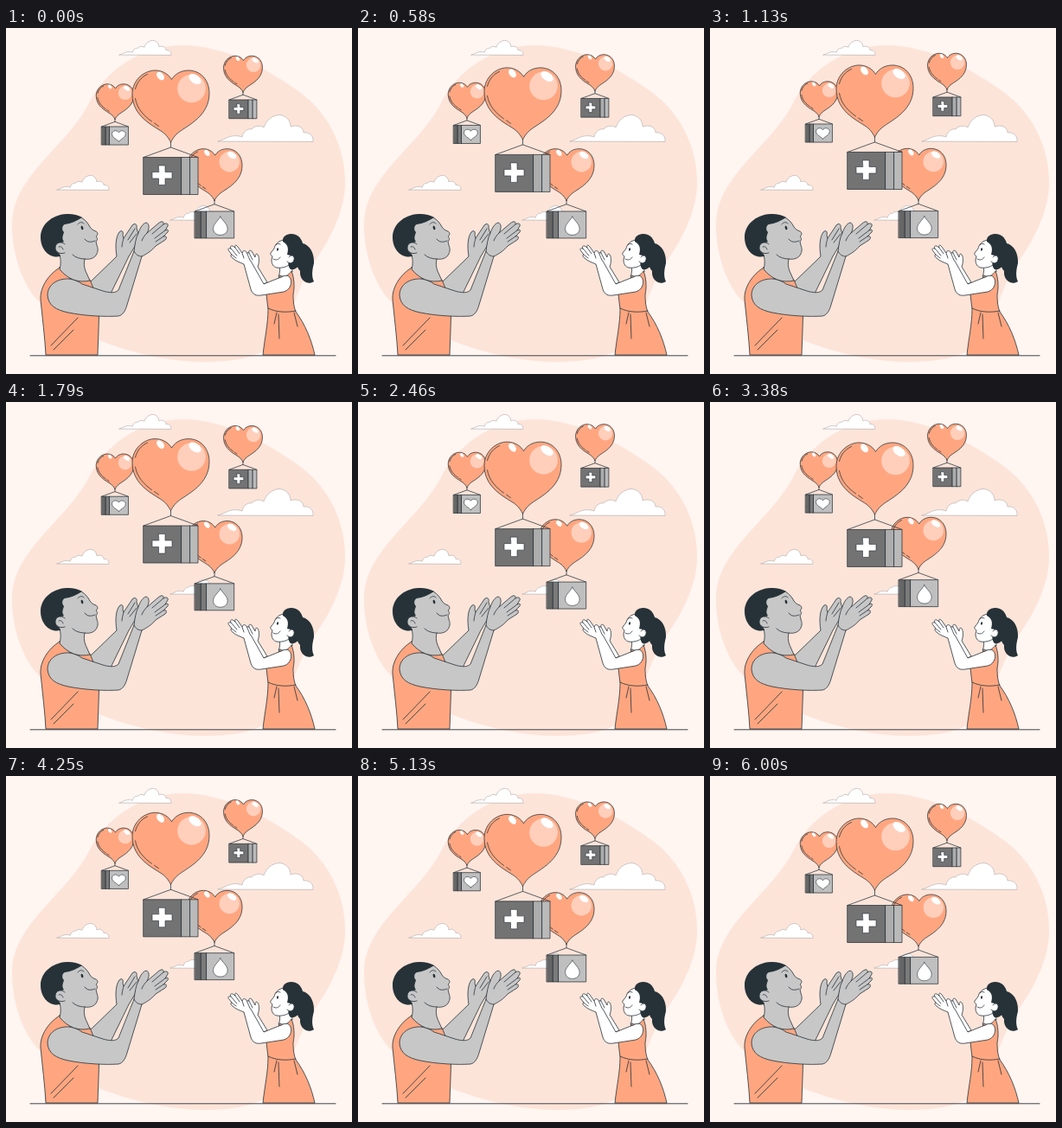
An HTML page with a canvas for the animation above (6.04 s loop, 400 px wide and 400 px high).

```html
<!DOCTYPE html>
<html lang="en">
<head>
<meta charset="utf-8">
<title>Floating aid</title>
<style>
html, body { margin: 0; width: 100%; height: 100%; overflow: hidden; background: #fff5f1; }
canvas { display: block; width: 400px; height: 400px; }
</style>
</head>
<body>
<canvas id="stage"></canvas>
<script>
const LOOP = 6040;
const INK = '#263238', ORANGE = '#ffa680', SKIN = '#c7c7c7', WHITE = '#fff';
const canvas = document.getElementById('stage');
const ctx = canvas.getContext('2d');
const dpr = window.devicePixelRatio || 1;
canvas.width = canvas.height = 400 * dpr;

function shape(d, fill, stroke = INK, width = 0.8) {
  const p = new Path2D(d);
  if (fill) { ctx.fillStyle = fill; ctx.fill(p); }
  if (stroke) { ctx.strokeStyle = stroke; ctx.lineWidth = width; ctx.stroke(p); }
}

const line = (d, width) => shape(d, null, INK, width);

function oval(x, y, rx, ry, turn, fill) {
  ctx.beginPath();
  ctx.ellipse(x, y, rx, ry, turn, 0, 7);
  ctx.fillStyle = fill;
  ctx.fill();
}

function placed(x, y, s, draw) {
  ctx.save();
  ctx.translate(x, y);
  ctx.scale(s, s);
  draw();
  ctx.restore();
}

const CLOUD = 'M0 0C6 -1 10 -5 16 -6C21 -7 25 -6 28 -5C29 -11 34 -15 39 -14C42 -18 49 -19 53 -16C56 -25 63 -30 71 -30.5C79 -30 84 -24 84 -17C92 -20 99 -16 99 -10C106 -11 111 -6 110 0Z';
const cloud = (x, y, s) => placed(x, y, s, () => shape(CLOUD, WHITE, '#b8b4b2', 0.7 / s));

const HEART = 'M0 -17.5C-2 -21 -4 -25 -10 -29.5C-20 -36.5 -44.5 -47 -44.5 -73C-44.5 -90 -30 -101 -17 -100.5C-8 -100 -2 -95 1 -90C4 -95 10 -100.5 21 -100.5C35 -100 44.5 -89 44.5 -74C44.5 -48 20 -37 10 -29.5C4 -25 2 -21 0 -17.5Z';
const ICONS = {
  cross: 'M-14 9.5H-6.5V17H1.5V24.5H-6.5V32H-14V24.5H-21.5V17H-14Z',
  drop: 'M9.5 8.5C13 15 21 20.500 21 27.5C21 34 16 38 9.5 38C3 38 -2 34 -2 27.5C-2 20.500 6 15 9.5 8.5Z',
  heart: 'M9 35C5 30 -7 26 -7 17.5C-7 9 5 7 9 14C13 7 25 9 25 17.5C25 26 13 30 9 35Z'
};
// Strips of a box: left edge, width, colour
const CROSS_BOX = [[-31.5, 44, '#737373'], [12.5, 10, '#adadad'], [22.5, 9, '#bababa']];
const LIGHT_BOX = [[-31.5, 10, '#666'], [-21.5, 9, '#7b7b7b'], [-12.5, 44, '#bfbfbf']];

// (x, y) is the middle of the box's top edge
function balloon(x, y, s, icon) {
  const w = 0.75 / s;
  placed(x, y, s, () => {
    shape(HEART, ORANGE, INK, w);
    oval(24, -79.5, 16.3, 16.3, 0, '#ffcfbb');
    oval(28, -90.5, 8, 4.8, 0.6, WHITE);
    oval(-12, -94, 5.5, 3.6, 0.9, WHITE);
    line('M-41 -68C-39 -56 -31 -48 -22 -41.5M-19 -39.5L-14 -36M-41 -79C-39 -87 -34 -93 -27 -96', w);
    line('M0 -17.5V-11.5L-31.5 0M0 -11.5L31.5 0', w);
    for (const [left, width, fill] of icon === 'cross' ? CROSS_BOX : LIGHT_BOX)
      shape(`M${left} 0h${width}v43h${-width}Z`, fill, INK, w);
    shape(ICONS[icon], WHITE, INK, w * 0.8);
  });
}

// Linear rise of 8 px and back
function lift(t, period, delay = 0) {
  if (t < delay) return 0;
  const p = (t - delay) % period / period;
  return 8 * (1 - Math.abs(2 * p - 1));
}

function scenery() {
  ctx.fillStyle = '#fff5f1';
  ctx.fillRect(0, 0, 400, 400);
  shape('M205 20C250 20 300 45 342 76C378 104 393 145 392 182C391 212 375 245 355 272C335 300 330 345 300 372C282 384 250 386 225 386C180 385 135 372 105 360C75 348 52 330 40 318C20 300 7 262 7 228C7 198 22 177 48 148C72 122 85 108 97 85C115 50 155 20 205 20Z', '#fde4d9', null);
  cloud(131, 31, 0.545);
  cloud(245, 131, 1);
  cloud(59, 187, 0.545);
  cloud(190, 222, 0.545);
}

function man() {
  // far arm and hand
  shape('M97 294L128 264C126 252 127 241 131 236C134 233 136 235 135 240L136 243L146 228C149 225 152 227 151 231L152 235C154 240 152 247 148 254L142 264L121 307L98 306Z', SKIN);
  line('M136 243C135 247 134 250 134 253M149 232L141 245M151 238L143 248');
  // shirt
  shape('M62 277C49 285 39 300 40 314C42 335 45 358 46 378H106L107.500 334L102 303L97 291C85 293 71 288 62 277Z', ORANGE);
  line('M52 367L83 335M55 372L78 349');
  // near arm and hand
  shape('M74 290C59 289 48 297 48 309C49 321 58 326 72 329C92 333 115 334 130 333C135 332 138 327 140 320L157 264C163 261 168 258 173 252L184 245C187 242 185 240 182 241L186 237C189 234 187 232 184 234L187 229C188 226 185 225 182 227C183 223 179 223 176 226L163 237C166 232 166 226 162 225C158 226 155 231 153 237C150 243 149 250 148 258L130 303C126 307 119 306 112 304L88 296C84 293 79 291 74 290Z', SKIN);
  line('M163 237C160 240 158 243 157 246M182 227L169 238M184 234L172 243M182 241L173 247M148 258C150 262 153 264 157 264');
  // neck and face in one outline
  shape('M58 255L62 262C64 270 63 275 62 279C72 291 84 295 97 292L92 281C90 276 90 271 91 267C97 268 103 266 105 261C107 257 106 254 105 251L104 247C106 245 106 243 104 241C107 239 106 236 104 235C101 234 99 233 97 230C95 226 92 222 87 219L64 222Z', SKIN);
  shape('M88 219C83 216 76 214.500 70 215C52 216 40 228 40 242C40 256 50 267 63 264L59 257L62 249L67 247C64 243 66 240 67 236C64 233 65 228 68 227C75 226 82 223 88 219Z', INK, null);
  shape('M68 250C64 246 57 248 57 254C57 259 62 262 68 260', SKIN);
  line('M61 253C63 252 65 253 66 256M91 267C85 267 80 265 77 262M91 244C94 248 98 248 103 246M83 227C85 224 88 224 90 226');
  oval(88, 231, 1.3, 2.3, -0.3, INK);
}

function woman() {
  // far arm and hand
  shape('M302 294L291 276C293 271 293 265 291 262C289 260 288 262 288 265L284 258C282 256 280 258 281 260C278 259 277 262 278 264C276 266 278 271 283 275L293 297Z', WHITE);
  line('M281 260L285 268M278 264L283 270');
  // neck and dress
  shape('M316 274C317 279 317 283 315 287L321 292L331 282L330 270Z', WHITE);
  shape('M317 286C321 289 327 286 330 281C333 288 334 299 332 308C332 317 333 323 335 328C346 343 353 360 357 378H297C299 359 303 342 303 325L301 308L313 294Z', ORANGE);
  line('M303 324C313 329 325 329 335 327M313 329L310 342M315 331L316 359M333 329L337 345');
  // near arm and hand
  shape('M318 288L298 296L284 271C281 268 280 263 278 259C276 257 274 257 273 260L268 253C266 250 264 251 265 254L262 252C260 251 259 253 260 255C257 254 256 256 258 258L261 262C259 262 260 265 262 266C266 270 271 271 275 273L283 302C285 308 289 310 295 309L321 305C328 303 331 296 329 290C327 285 322 286 318 288Z', WHITE);
  line('M265 254L270 261M260 255L267 263M261 262L266 266M273 260L275 266');
  // ponytail, face and hair
  shape('M338 249C349 247 357 259 356 272C354 279 353 287 356 293C349 298 339 292 340 281C335 276 333 262 338 249Z', INK, null);
  shape('M321 245C315 246 311 250 310 255L306 260C305 262 307 263 308 264L307 268C307 273 309 276 313 277C321 278 329 275 332 268L336 250Z', WHITE);
  shape('M320 247C319 240 327 236 335 239C343 242 346 254 343 265C341 275 335 280 329 279C326 276 326 272 327 269L329 263L325 262C327 255 326 250 320 247Z', INK, null);
  shape('M327 265C330 261 334 264 333 268C332 272 328 273 325 270', WHITE);
  line('M309 267C312 269 315 268 317 265M312 251C313 249 315 249 317 250');
  oval(314, 256, 1, 1.7, 0.2, INK);
}

function draw(now) {
  const t = now % LOOP;
  ctx.setTransform(dpr, 0, 0, dpr, 0, 0);
  ctx.lineJoin = ctx.lineCap = 'round';
  scenery();
  const slow = lift(t, 6000);
  balloon(274, 83 - slow, 0.505, 'cross');
  balloon(126, 114 - slow, 0.49, 'heart');
  balloon(241, 212 - lift(t, 6000, 1000), 0.72, 'drop');
  balloon(190.5, 149.5 - lift(t, 3000), 1, 'cross');
  man();
  woman();
  line('M28 378.8H381', 0.9);
  requestAnimationFrame(draw);
}

draw(performance.now());
</script>
</body>
</html>
```
